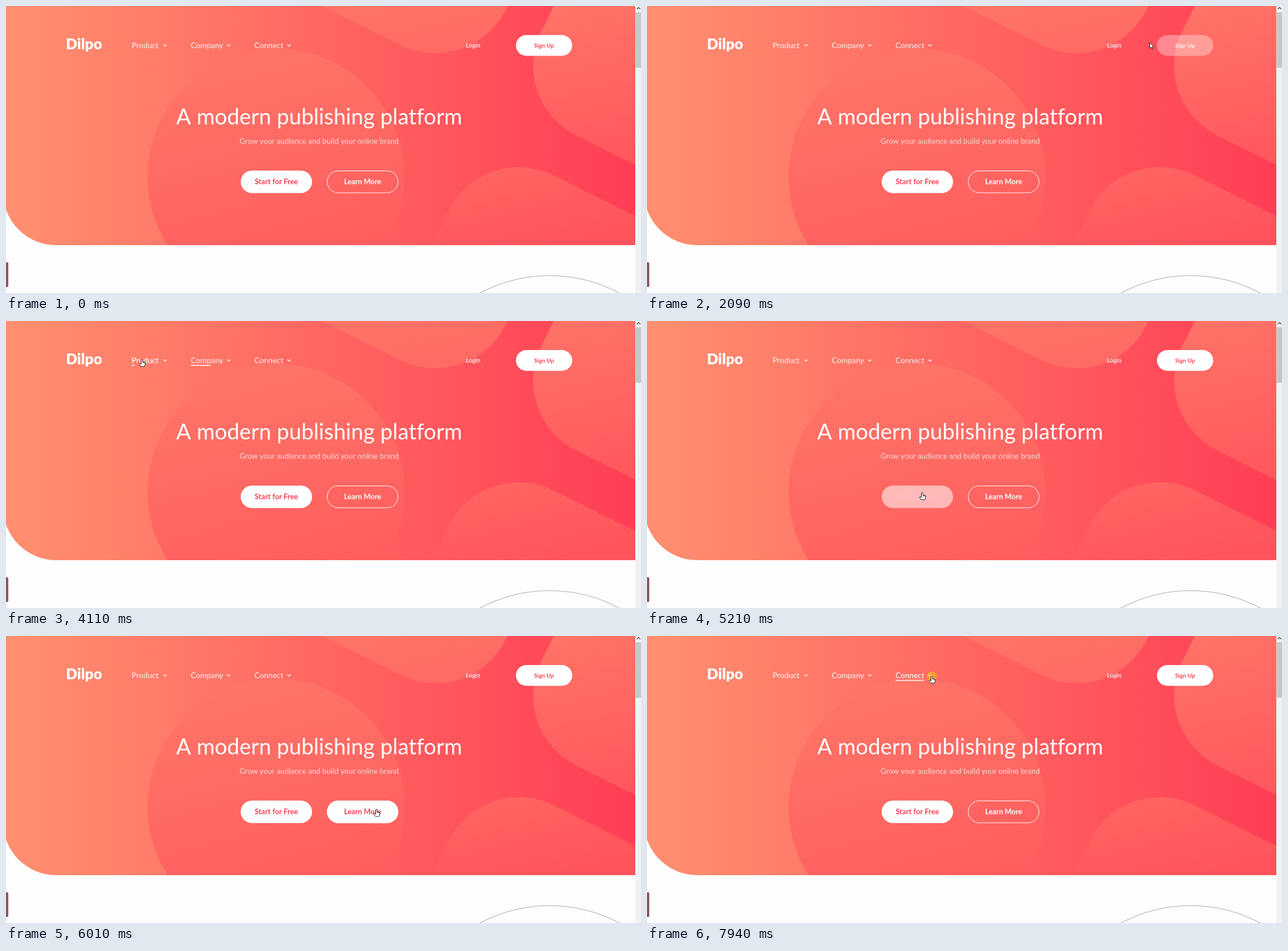
Animation of 1112 by 504 pixels, one loop 8 s. Source, as an HTML page with a canvas:

```html
<!DOCTYPE html>
<html lang="en">
<head>
<meta charset="utf-8">
<title>Publishing platform</title>
<style>
  html, body { margin: 0; width: 100%; height: 100%; overflow: hidden; background: #fefefe; }
  canvas { display: block; }
</style>
</head>
<body>
<canvas id="stage" width="1112" height="504"></canvas>
<script>
const ctx = document.getElementById('stage').getContext('2d');
const LOOP = 8000, STEP = 10;
const PAGE_W = 1102;
const FADE = 200, LINE = 300;
const HOVER_ALPHA = 0.3;

// Places the cursor visits: arrival time, position, rest before moving on
const stops = [
  { at: 460, x: 1085, y: 486 },
  { at: 1080, x: 990, y: 122, rest: 330 },
  { at: 2050, x: 915, y: 68 },
  { at: 2090, x: 881, y: 64 },
  { at: 2800, x: 497, y: 66 },
  { at: 3250, x: 482, y: 66, rest: 200 },
  { at: 4040, x: 330, y: 68 },
  { at: 4110, x: 238, y: 67, rest: 110 },
  { at: 5000, x: 497, y: 345 },
  { at: 5210, x: 482, y: 301 },
  { at: 5750, x: 536, y: 306 },
  { at: 6010, x: 649, y: 304, rest: 410 },
  { at: 7200, x: 488, y: 79 },
  { at: 7940, x: 499, y: 70 }
];

const link = (label, x, w) => ({ label, x, y: 56, w, h: 22, line: w - 14.5 });
const links = [link('Product', 220, 62.5), link('Company', 323.5, 70.5), link('Connect', 435, 64.5)];
const signUp = { label: 'Sign Up', x: 893, y: 51, w: 98.5, h: 36.5, size: 10.2 };
const start = { label: 'Start for Free', x: 411, y: 289, w: 125, h: 39.5, size: 12.9 };
const learn = { label: 'Learn More', x: 562, y: 289, w: 125, h: 39.5, size: 12.7, outline: true };
const buttons = [signUp, start, learn];
const targets = [...links, ...buttons];

const arrow = new Path2D('M0 0V10.4L2.4 8.3L4 11.8L5.6 11.1L4.1 7.7H7Z');
const hand = new Path2D('M-1.6 1Q-.3 -.6 1 1V4.4L5 5.4Q6 5.8 6 7L5.4 10L4.4 12.8H-2L-5 8.6Q-5 7 -3.2 7.6L-1.6 9Z');
const knuckles = new Path2D('M1 4.4V7M2.8 5V7.2M4.4 5.5V7.4');

const clamp = v => Math.max(0, Math.min(1, v));
const mix = (a, b, k) => a + (b - a) * k;
const white = a => `rgba(255,255,255,${a})`;
const redToWhite = k => `rgb(255,${mix(65, 255, k)},${mix(83, 255, k)})`;

function cursorAt(t) {
  if (t < stops[0].at) return null;
  const i = stops.findIndex(s => s.at > t);
  if (i < 0) return stops[stops.length - 1];
  const a = stops[i - 1], b = stops[i];
  const leave = a.at + (a.rest || 0);
  const k = clamp((t - leave) / (b.at - leave));
  return { x: mix(a.x, b.x, k), y: mix(a.y, b.y, k) };
}

function isOver(box, t) {
  const p = cursorAt(t);
  return !!p && p.x >= box.x && p.x < box.x + box.w && p.y >= box.y && p.y < box.y + box.h;
}

// Follow the cursor once through the loop and note when each target is hovered
for (const box of targets) {
  box.spans = [];
  let span = null;
  for (let t = 0; t <= LOOP; t += STEP) {
    if (!isOver(box, t)) span = null;
    else if (span) span[1] = t + STEP;
    else box.spans.push(span = [t, t + STEP]);
  }
}

function hoverLevel(box, t, time) {
  return Math.max(0, ...box.spans.map(([a, b]) => {
    const peak = clamp((Math.min(t, b) - a) / time);
    return clamp(peak - Math.max(0, t - b) / time);
  }));
}

function text(str, x, y, font, color, align = 'left') {
  ctx.font = font + ' Lato, sans-serif';
  ctx.letterSpacing = '0.01px'; // keeps ligatures off
  ctx.fillStyle = color;
  ctx.textAlign = align;
  ctx.fillText(str, x, y);
}

function gradient(x0, y0, x1, y1, from, to) {
  const g = ctx.createLinearGradient(x0, y0, x1, y1);
  g.addColorStop(0, from);
  g.addColorStop(1, to);
  return g;
}

// Tilted rectangle with large round corners, placed by the centre of its corner arc
function slab(cx, cy, x, y, w, h, radii, fill) {
  ctx.save();
  ctx.translate(cx, cy);
  ctx.rotate(Math.atan(0.5));
  ctx.beginPath();
  ctx.roundRect(x, y, w, h, radii);
  ctx.restore();
  ctx.fillStyle = fill;
  ctx.fill();
}

function hero() {
  ctx.save();
  ctx.beginPath();
  ctx.roundRect(-5, -10, PAGE_W + 5, 430, [0, 0, 0, 93]);
  ctx.fillStyle = gradient(-5, 0, PAGE_W, 0, '#ff9070', '#ff3d54');
  ctx.fill();
  ctx.clip();

  ctx.fillStyle = gradient(415, 85, 531, 515, '#ff7467', '#ff595d');
  ctx.beginPath();
  ctx.arc(473, 300, 225, 0, 7);
  ctx.fill();

  const r = 137, far = 600;
  slab(752, -54, -far, -r, far + r, 2 * r, [0, r, r, 0], gradient(700, -80, 740, 83, '#ff7868', '#ff6a64'));
  slab(1060, 105, -r, -far, far, far + r, [0, 0, 0, r], gradient(1000, -20, 1070, 280, '#ff7467', '#ff575d'));
  slab(898, 420, -r, -r, far, far, [r, 0, 0, 0], gradient(880, 280, 920, 430, '#ff6461', '#ff545c'));
  ctx.restore();
}

function pageEdges() {
  ctx.strokeStyle = '#c6c6c6';
  ctx.lineWidth = 1.7;
  ctx.beginPath();
  ctx.arc(952, 732.5, 259, Math.PI, 0);
  ctx.stroke();

  ctx.fillStyle = '#91545f';
  ctx.beginPath();
  ctx.roundRect(-6, 450, 10, 43.5, 2);
  ctx.fill();

  ctx.fillStyle = '#f1f1f1';
  ctx.fillRect(PAGE_W, 0, 10, 504);
  ctx.fillStyle = '#c7c7c7';
  ctx.fillRect(PAGE_W + 0.5, 11, 9.5, 97.5);
  chevron(1107.7, 4, -1, '#505050');
}

function chevron(x, y, dir, color) {
  ctx.strokeStyle = color;
  ctx.lineWidth = 1.5;
  ctx.beginPath();
  ctx.moveTo(x - 3, y - 1.5 * dir);
  ctx.lineTo(x, y + 1.5 * dir);
  ctx.lineTo(x + 3, y - 1.5 * dir);
  ctx.stroke();
}

function drawLink(box, t) {
  text(box.label, box.x, 74, '500 13.6px', white(isOver(box, t) ? 1 : 0.85));
  chevron(box.x + box.w - 4, 69, 1, white(0.9));
  ctx.fillStyle = '#fff';
  ctx.fillRect(box.x, 77.2, box.line * hoverLevel(box, t, LINE), 1.5);
}

function drawButton({ label, x, y, w, h, size, outline, spans }, t) {
  const hover = hoverLevel({ spans }, t, FADE);
  ctx.beginPath();
  ctx.roundRect(x, y, w, h, h / 2);
  ctx.fillStyle = white(outline ? hover : mix(1, HOVER_ALPHA, hover));
  ctx.fill();
  if (outline) {
    ctx.strokeStyle = '#fff';
    ctx.lineWidth = 1;
    ctx.beginPath();
    ctx.roundRect(x + 0.5, y + 0.5, w - 1, h - 1, h / 2 - 0.5);
    ctx.stroke();
  }
  const color = redToWhite(outline ? 1 - hover : hover);
  text(label, x + w / 2, y + h / 2 + size * 0.36, `700 ${size}px`, color, 'center');
}

function click() {
  ctx.fillStyle = 'rgba(255,170,40,0.82)';
  ctx.beginPath();
  ctx.arc(499, 71, 9, 0, 7);
  ctx.fill();
  chevron(495.5, 69, 1, 'rgba(255,225,150,0.8)');
}

function drawCursor(t) {
  const p = cursorAt(t);
  if (!p) return;
  const pointing = targets.some(box => isOver(box, t));
  const shape = pointing ? hand : arrow;
  ctx.save();
  ctx.translate(p.x, p.y);
  ctx.fillStyle = '#fff';
  ctx.strokeStyle = '#222';
  ctx.lineWidth = 1;
  ctx.lineJoin = 'round';
  ctx.fill(shape);
  ctx.stroke(shape);
  ctx.lineWidth = 0.7;
  if (pointing) ctx.stroke(knuckles);
  ctx.restore();
}

function draw(t) {
  ctx.fillStyle = '#fefefe';
  ctx.fillRect(0, 0, 1112, 504);
  hero();
  pageEdges();

  text('Dilpo', 105, 75.5, '900 26px', '#fff');
  text('Login', 818, 73, '700 10.6px', white(0.85), 'center');
  text('A modern publishing platform', 548.5, 208, '400 38.4px', '#fff', 'center');
  text('Grow your audience and build your online brand', 548.5, 242, '400 13.2px', white(0.75), 'center');

  links.forEach(box => drawLink(box, t));
  buttons.forEach(box => drawButton(box, t));
  if (t >= 7880) click();
  drawCursor(t);
}

const began = performance.now();
function tick() {
  draw((performance.now() - began) % LOOP);
  requestAnimationFrame(tick);
}
tick();
</script>
</body>
</html>
```
